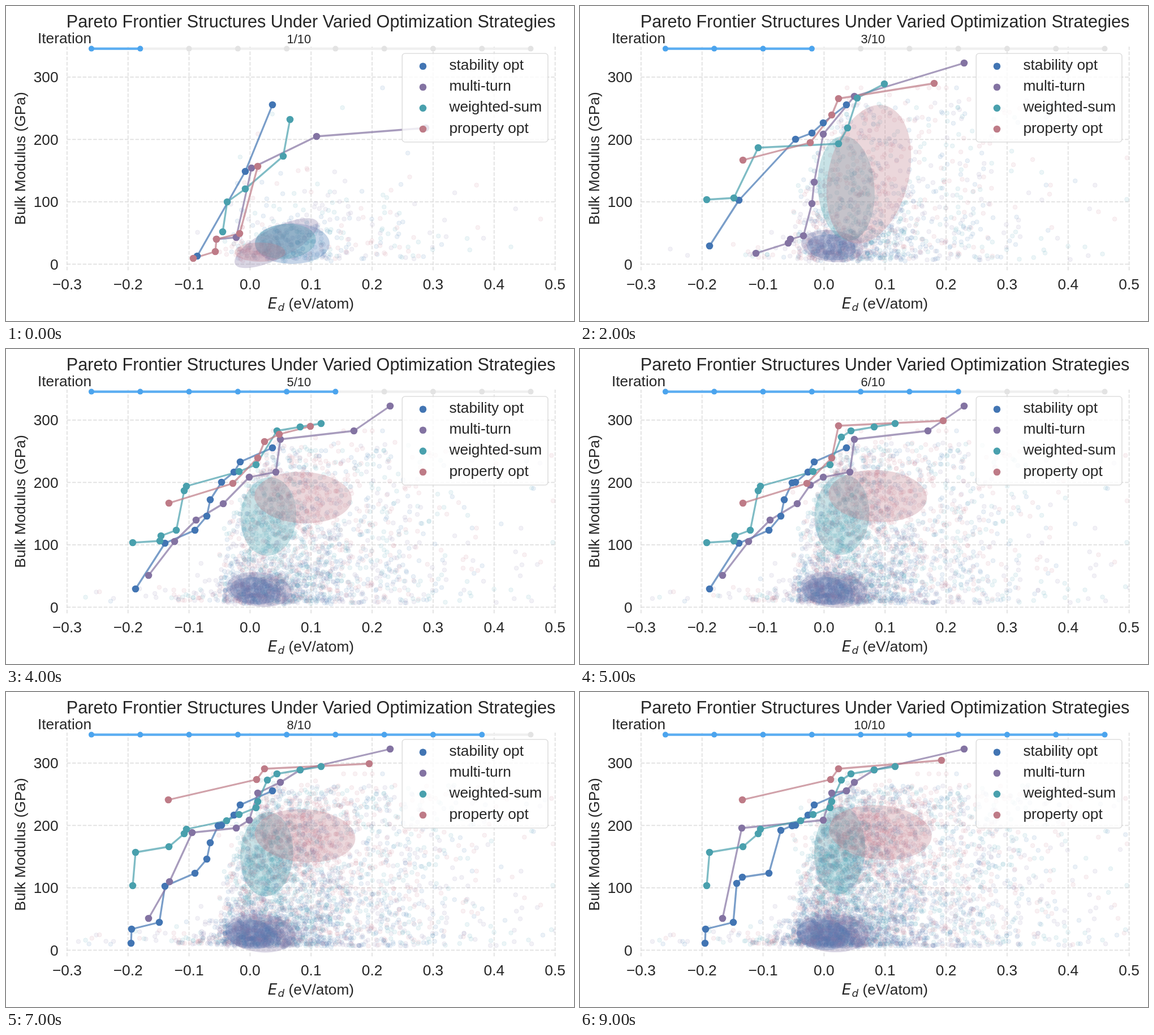
Recreate the animation shown at these times as an HTML page with a canvas. Size 1004 by 558 pixels, loop 10 s.

```html
<!DOCTYPE html>
<html lang="en">
<head>
<meta charset="utf-8">
<title>Pareto frontier iterations</title>
<style>
  html, body { margin: 0; width: 100%; height: 100%; overflow: hidden; background: #fff; }
  canvas { display: block; }
</style>
</head>
<body>
<canvas id="stage" width="1004" height="558"></canvas>
<script>
const ctx = document.getElementById('stage').getContext('2d');
const SANS = '"Liberation Sans", Arial, sans-serif';
const PLOT = { left: 107.7, right: 970.5, top: 72, bottom: 468.3 };
const CENTER = (PLOT.left + PLOT.right) / 2;
const STEP_MS = 1000, STEPS = 10;
const INK = '#262626';

const toX = v => 431.4 + v * 1078.5;
const toY = v => 457.3 - v * 1.1045;

// ellipses: key step -> center x, center y, radius x, radius y, degrees; blended between keys.
// finds: step -> x, y of the best structures discovered then.
const SERIES = [
  {
    name: 'stability opt', color: '#4275b3', tailPower: 1.5,
    ellipses: { 1: [506, 421, 66, 36, 0], 2: [446, 427, 43, 22, 6], 10: [430, 430, 48, 27, 6] },
    finds: {
      1: [338, 443, 423, 293, 471, 175],
      2: [271, 443, 313, 411, 371, 371, 381, 236, 410, 225],
      3: [229, 425, 281, 344, 430, 207],
      4: [334, 321, 355, 296, 403, 218],
      5: [361, 267, 414, 200],
      6: [375, 237],
      7: [221, 445, 222, 420],
      8: [271, 408],
      9: [355, 245],
      10: [277, 339, 287, 328]
    }
  },
  {
    name: 'multi-turn', color: '#8373a2', tailPower: 1.5,
    ellipses: {
      1: [478, 420, 82, 27, -27], 2: [445, 425, 54, 27, 7], 8: [450, 427, 62, 34, 6],
      9: [453, 426, 60, 102, 24], 10: [447, 427, 63, 34, 3]
    },
    finds: {
      1: [372, 413, 407, 410, 434, 287, 549, 231, 742, 216],
      2: [311, 438, 368, 420, 395, 407, 410, 350, 414, 312],
      3: [430, 227, 485, 160, 679, 101],
      4: [336, 303, 384, 274, 477, 218, 615, 145],
      5: [252, 401, 298, 341],
      6: [407, 241],
      7: [289, 336, 329, 249, 445, 179, 520, 138],
      9: [286, 241, 471, 175]
    }
  },
  {
    name: 'weighted-sum', color: '#49a0ad', tailPower: 1.1,
    ellipses: {
      1: [494, 417, 54, 31, -5], 2: [476, 346, 50, 118, -12],
      4: [465, 300, 50, 68, 4], 10: [459, 281, 45, 78, 3]
    },
    finds: {
      1: [383, 400, 391, 347, 423, 324, 490, 266, 502, 201],
      2: [224, 343, 272, 340, 320, 259, 457, 244, 473, 216, 490, 163, 538, 138],
      3: [315, 251],
      4: [274, 331, 319, 243, 442, 205, 520, 138],
      5: [301, 321, 412, 217, 479, 145, 557, 132],
      6: [462, 156],
      7: [229, 284, 288, 274, 390, 228, 445, 194]
    }
  },
  {
    name: 'property opt', color: '#be7b87', tailPower: 0.9,
    ellipses: {
      1: [449, 436, 45, 17, 0], 2: [497, 330, 57, 205, 24.6],
      4: [524, 266, 85, 45, 2], 10: [531, 249, 91, 48, 5]
    },
    finds: {
      1: [331, 447, 370, 435, 372, 413, 413, 403, 445, 284],
      2: [384, 274, 407, 242, 450, 233, 457, 164, 626, 137],
      3: [288, 273, 445, 193],
      4: [401, 238, 483, 151, 538, 137],
      6: [457, 136, 642, 127],
      7: [287, 191, 443, 155],
      9: [639, 121]
    }
  }
];

function ellipseAt({ ellipses }, step) {
  const keys = Object.keys(ellipses).map(Number);
  const from = keys.findLast(k => k <= step), to = keys.find(k => k >= step);
  const mix = (step - from) / (to - from || 1);
  return ellipses[from].map((v, i) => v + (ellipses[to][i] - v) * mix);
}

// A find stays on the front until another lies at least as far left and as high.
function frontAt({ finds }, step) {
  const points = [];
  for (const [found, xy] of Object.entries(finds)) {
    for (let i = 0; found <= step && i < xy.length; i += 2) points.push([xy[i], xy[i + 1]]);
  }
  const beaten = p => points.some(q => q !== p && q[0] <= p[0] && q[1] <= p[1]);
  return points.filter(p => !beaten(p)).sort((p, q) => p[0] - q[0] || q[1] - p[1]);
}

let seed = 20117;
function random() {
  seed = (seed * 1664525 + 1013904223) % 4294967296;
  return (seed + 1) / 4294967297;
}
const expo = scale => -Math.log(random()) * scale;
const gauss = () => Math.sqrt(expo(2)) * Math.cos(2 * Math.PI * random());

function samplePoint(series, step) {
  const kind = random();
  let x, y;
  if (kind < 0.36) {
    const [cx, cy, rx, ry, deg] = ellipseAt(series, step);
    const t = deg * Math.PI / 180, u = gauss() * rx * 0.65, v = gauss() * ry * 0.6;
    x = cx + u * Math.cos(t) - v * Math.sin(t);
    y = cy + u * Math.sin(t) + v * Math.cos(t);
  } else if (kind < 0.4 && step > 1) {
    x = 420 - expo(75);
    y = 447 - expo(12);
  } else {
    x = 375 + expo(92) + expo(92);
    const reach = 285 * Math.min(1, (x - 320) / 150);
    y = step === 1 ? 448 - expo(50) : 450 - reach * random() ** series.tailPower;
  }
  return { x, y: y > 452 ? 904 - y : Math.max(y, 145), color: series.color };
}

const cloud = Array.from({ length: STEPS }, (_, i) =>
  SERIES.flatMap(series => Array.from({ length: 125 }, () => samplePoint(series, i + 1))));

function disc(x, y, r, color) {
  ctx.fillStyle = color;
  ctx.beginPath();
  ctx.arc(x, y, r, 0, 2 * Math.PI);
  ctx.fill();
}

function polyline(points, color, width) {
  ctx.strokeStyle = color;
  ctx.lineWidth = width;
  ctx.beginPath();
  points.forEach(([x, y]) => ctx.lineTo(x, y));
  ctx.stroke();
}

function label(text, x, y, size = 26.3, align = 'left', font = SANS) {
  ctx.font = `${size}px ${font}`.replace(/^(.*px) italic/, 'italic $1');
  ctx.textAlign = align;
  ctx.fillStyle = INK;
  ctx.fillText(text, x, Math.round(y));
}

function drawAxes() {
  ctx.setLineDash([6.5, 2.8]);
  for (let i = -3; i <= 5; i++) {
    const x = toX(i / 10);
    polyline([[x, PLOT.bottom], [x, PLOT.top]], '#e0e0e0', 1.75);
    label((i / 10).toFixed(1).replace('-', '\u2212'), x, 501.5, 26.3, 'center');
  }
  for (let v = 0; v <= 300; v += 100) {
    const y = toY(v);
    polyline([[PLOT.left, y], [PLOT.right, y]], '#e0e0e0', 1.75);
    label(v, 92.6, y + 9.3, 26.3, 'right');
  }
  ctx.setLineDash([]);

  label('Pareto Frontier Structures Under Varied Optimization Strategies', CENTER, 38, 30.65, 'center');
  const math = 'italic "DejaVu Sans", sans-serif';
  label('E', 462.7, 536, 26.3, 'left', math);
  label('d', 480.5, 540, 18.4, 'left', math);
  label('(eV/atom)', 499.6, 536);
  ctx.save();
  ctx.translate(34, 270);
  ctx.rotate(-Math.PI / 2);
  label('Bulk Modulus (GPa)', 0, 0, 26.3, 'center');
  ctx.restore();
}

function drawCloud(step) {
  ctx.globalAlpha = 0.1;
  ctx.lineWidth = 1;
  for (const { x, y, color } of cloud.slice(0, step).flat()) {
    disc(x, y, 3.8, color);
    ctx.strokeStyle = color;
    ctx.stroke();
  }
  ctx.globalAlpha = 0.3;
  for (const series of SERIES) {
    const [cx, cy, rx, ry, deg] = ellipseAt(series, step);
    ctx.fillStyle = series.color;
    ctx.beginPath();
    ctx.ellipse(cx, cy, rx, ry, deg * Math.PI / 180, 0, 2 * Math.PI);
    ctx.fill();
  }
  ctx.globalAlpha = 1;
}

function drawFronts(step) {
  const fronts = SERIES.map(series => frontAt(series, step));
  ctx.lineJoin = 'round';
  ctx.globalAlpha = 0.7;
  fronts.forEach((points, i) => polyline(points, SERIES[i].color, 3.3));
  ctx.globalAlpha = 1;
  fronts.forEach((points, i) => points.forEach(([x, y]) => disc(x, y, 6.3, SERIES[i].color)));
}

function drawProgress(step) {
  const y = 75.6, dotX = i => toX(-0.26 + 0.08 * i);
  const bar = (last, line, dot) => {
    polyline([[dotX(0), y], [dotX(last), y]], line, 4.4);
    for (let i = 0; i <= last; i++) disc(dotX(i), y, 5, dot);
  };
  bar(9, '#efefef', '#e3e3e3');
  bar(Math.min(step, 9), '#5aadf2', '#4ba4ee');
  label('Iteration', 56, 66);
  label(`${step}/${STEPS}`, CENTER, 66, 21.9, 'right');
}

function drawLegend() {
  ctx.beginPath();
  ctx.roundRect(700.3, 84, 257.6, 157, 5);
  ctx.fillStyle = 'rgba(255,255,255,0.8)';
  ctx.fill();
  ctx.strokeStyle = 'rgba(204,204,204,0.65)';
  ctx.lineWidth = 1.6;
  ctx.stroke();
  SERIES.forEach(({ name, color }, i) => {
    disc(737, 106.7 + 37.1 * i, 6.3, color);
    label(name, 783.4, 113 + 37.2 * i);
  });
}

function draw(step) {
  ctx.fillStyle = '#fff';
  ctx.fillRect(0, 0, 1004, 558);
  drawAxes();
  ctx.save();
  ctx.beginPath();
  ctx.rect(PLOT.left, PLOT.top, PLOT.right - PLOT.left, PLOT.bottom - PLOT.top);
  ctx.clip();
  drawCloud(step);
  drawFronts(step);
  ctx.restore();
  drawProgress(step);
  drawLegend();
}

let shown = 0;
function tick() {
  const step = Math.floor(performance.now() / STEP_MS) % STEPS + 1;
  if (step !== shown) draw(shown = step);
  requestAnimationFrame(tick);
}
tick();
</script>
</body>
</html>
```
